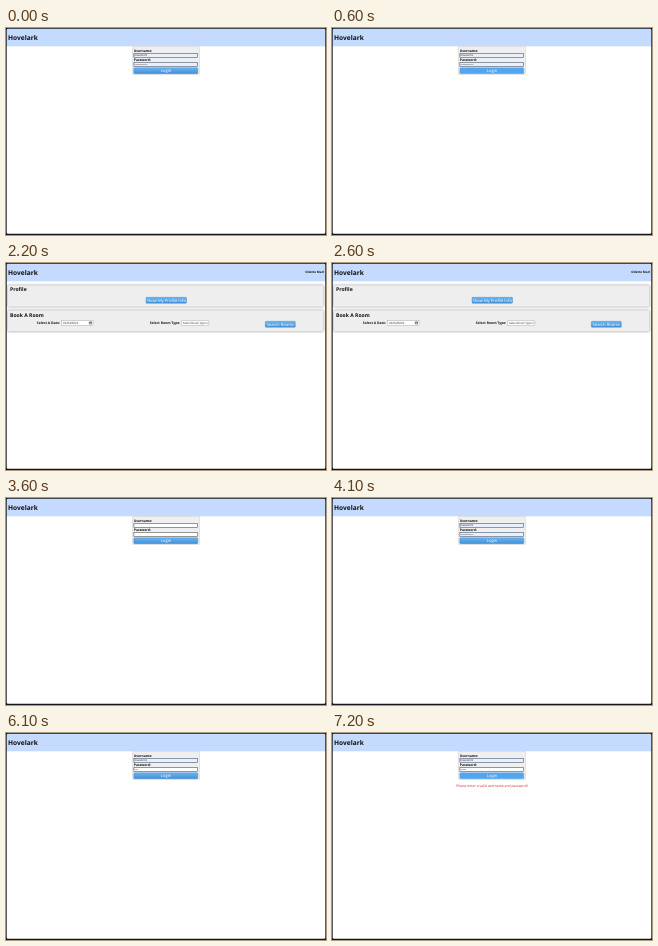
An HTML page that plays this animation: 320 px wide and 207 px high, repeating every 8100 ms.

```html
<!DOCTYPE html>
<html lang="en">
<head>
<meta charset="utf-8">
<title>Login demo</title>
<style>
html, body { margin: 0; width: 100%; height: 100%; overflow: hidden; background: #fff; }
svg { display: block; width: 320px; height: 207px; }
text { font: 3.4px "Open Sans", "Noto Sans", sans-serif; fill: #111; text-rendering: geometricPrecision; }
.brand { font-size: 6.6px; font-weight: 700; }
.head { font-size: 5.1px; font-weight: 700; }
.label { font-weight: 700; }
.field { font: 2.8px "Liberation Sans", Arial, sans-serif; fill: #333; }
.button { font-size: 4.15px; font-weight: 500; fill: #fff; text-anchor: middle; }
.menu { font: 2.9px "Liberation Sans", Arial, sans-serif; fill: #eee; }
.panel { fill: #eee; filter: drop-shadow(.5px .8px .8px #0007); }
.form { fill: #efefef; filter: drop-shadow(0 .2px .6px #0005); }
.input { fill: #fff; stroke: #555; stroke-width: .6; }
.filled { fill: #e8f0fe; stroke: #4a5a70; }
.focused { fill: #e8f0fe; stroke: #2f86e0; stroke-width: .9; }
.blue { fill: url(#gloss); stroke: #4185c4; stroke-width: .4; }
.hover { fill: #53a5ee; stroke: #53a5ee; }
</style>
</head>
<body>
<svg viewBox="0 0 320 207">
  <defs>
    <linearGradient id="gloss" x2="0" y2="1">
      <stop stop-color="#69b5f1"/><stop offset="1" stop-color="#438fd5"/>
    </linearGradient>
  </defs>
  <rect width="320" height="207" fill="#fff"/>
  <rect width="320" height="18.3" fill="#c4daff"/>
  <text class="brand" x="2" y="12.2">Hovelark</text>

  <g id="login">
    <rect class="form" x="126.5" y="18.3" width="67" height="28"/>
    <text class="label" x="127.8" y="24">Username:</text>
    <rect id="userBox" x="127.9" y="25.3" width="63.7" height="4"/>
    <text id="user" class="field" x="128.6" y="28.3">traveler31</text>
    <text class="label" x="127.8" y="33.3">Password:</text>
    <rect id="passBox" x="127.9" y="34.5" width="63.7" height="4"/>
    <g id="dots" fill="#333"></g>
    <rect id="submit" x="127.8" y="39.8" width="64" height="5.9" rx=".7"/>
    <text class="button" x="160" y="44">Login</text>
    <g id="menu">
      <rect x="127.5" y="39" width="65" height="23.2" rx=".8" fill="#303437"/>
      <path d="M127.5 53.4h65" stroke="#55595c" stroke-width=".4"/>
      <circle cx="132" cy="45.6" r=".8" fill="none" stroke="#bbb" stroke-width=".5"/>
      <path d="M132 46.4v1.6h.7" fill="none" stroke="#bbb" stroke-width=".5"/>
      <text class="menu" x="136" y="45">traveler31</text>
      <path d="M136.4 48.2h15" stroke="#bbb" stroke-width=".7" stroke-linecap="round" stroke-dasharray="0 1.25"/>
      <text class="menu" x="130" y="58.9">Manage Passwords…</text>
    </g>
    <text id="error" x="160" y="54.2" text-anchor="middle" style="fill:#c8202c">Please enter a valid username and password!</text>
  </g>

  <g id="dashboard">
    <text class="label" x="318" y="10.4" text-anchor="end" style="font-size:3.1px">Odette Marl</text>
    <rect class="panel" x="1.5" y="22.3" width="316" height="21.4" rx=".8"/>
    <text class="head" x="4" y="28.3">Profile</text>
    <rect class="blue" x="140" y="34.3" width="40.5" height="6" rx=".7"/>
    <text class="button" x="160.2" y="38.7">Show My Profile Info</text>
    <rect class="panel" x="1.5" y="47.3" width="316" height="21.2" rx=".8"/>
    <text class="head" x="4" y="53.8">Book A Room</text>
    <text class="label" x="30.8" y="61.3">Select A Date:</text>
    <rect class="input" x="55.5" y="57.7" width="31.5" height="4.8" style="stroke:#999;stroke-width:.4"/>
    <text class="field" x="57" y="61.1" style="font-size:3.1px">01/04/2021</text>
    <path d="M83.3 59h2.2v2h-2.2zM83.3 59.3h2.2" fill="none" stroke="#222" stroke-width=".5"/>
    <text class="label" x="143.7" y="61.3">Select Room Type:</text>
    <rect class="input" x="175.4" y="57.7" width="27.4" height="4.8" rx=".5" style="stroke:#999;stroke-width:.4"/>
    <text class="field" x="176.8" y="61">Select Room Type</text>
    <path d="M200.2 59.6l.8.9.8-.9" fill="none" stroke="#222" stroke-width=".5"/>
    <rect class="blue" x="259.3" y="58.3" width="30" height="6" rx=".7"/>
    <text class="button" x="274.3" y="62.7">Search Rooms</text>
  </g>

  <path d="M0 0H320V207H0ZM2 .7Q.7 .7 .7 2V204.4Q.7 205.8 2 205.8H318Q319.3 205.8 319.3 204.4V2Q319.3 .7 318 .7Z" fill="#15171c" fill-rule="evenodd"/>
</svg>
<script>
const LOOP = 8100;
const el = id => document.getElementById(id);
const show = (id, on) => el(id).style.display = on ? '' : 'none';
const style = (id, name) => el(id).setAttribute('class', name);

for (let i = 0; i < 12; i++) {
  const dot = document.createElementNS('http://www.w3.org/2000/svg', 'circle');
  dot.setAttribute('cx', 129.1 + i * 1.08);
  dot.setAttribute('cy', 36.6);
  dot.setAttribute('r', .4);
  el('dots').append(dot);
}

function draw(now) {
  const t = now % LOOP;
  const during = (from, to) => t >= from && t < to;
  const empty = during(3600, 4100);
  const typing = t >= 6100;
  const menu = during(5500, 6100);
  const dashboard = during(2200, 3600);
  const hover = during(100, 2200) || t >= 6700;
  const count = empty ? 0 : typing ? Math.min(5, 3 + Math.floor((t - 6100) / 100)) : 12;

  show('dashboard', dashboard);
  show('login', !dashboard);
  show('user', !empty);
  show('menu', menu);
  show('error', t >= 6900);
  style('userBox', empty ? 'input' : 'input filled');
  style('passBox', menu ? 'input focused' : empty || typing ? 'input' : 'input filled');
  style('submit', hover ? 'blue hover' : 'blue');
  [...el('dots').children].forEach((dot, i) => dot.style.display = i < count ? '' : 'none');
  requestAnimationFrame(draw);
}
draw(performance.now());
</script>
</body>
</html>
```
